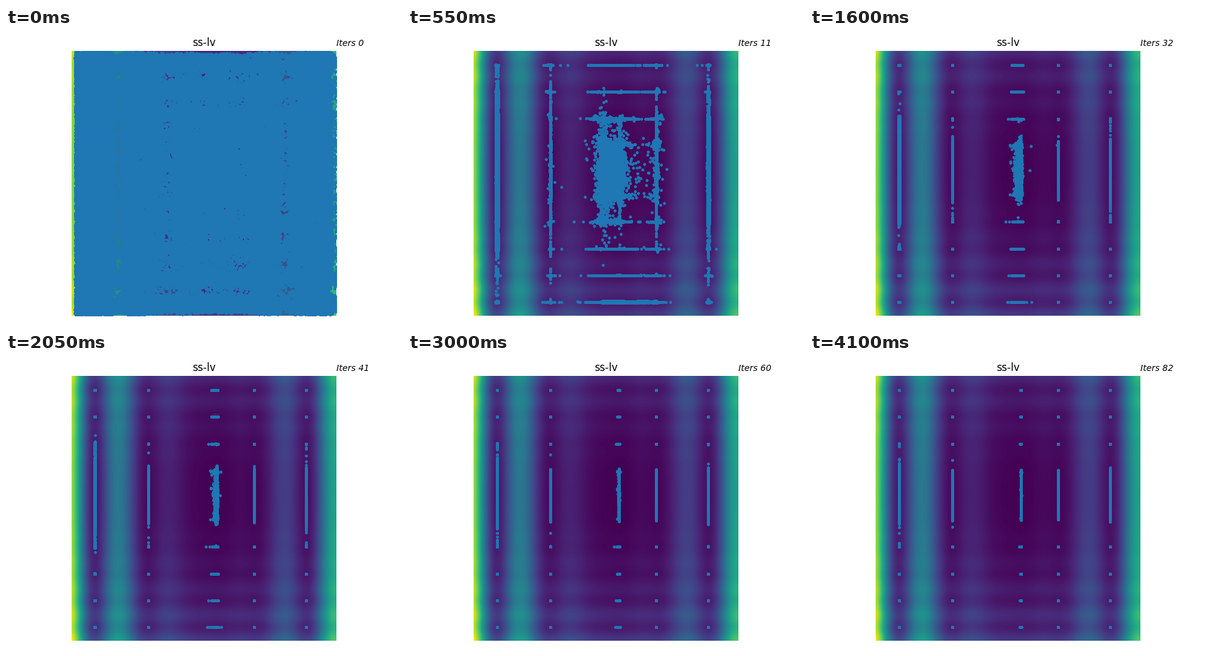
A matplotlib script that plays this animation: 640 by 480 pixels, repeating every 4.15 s.

```python
import numpy as np
import matplotlib.pyplot as plt
from matplotlib.animation import FuncAnimation

FRAMES, INTERVAL = 83, 50
LIMIT = 10
POINTS = 80_000
STEP, DECAY, SOFT = 0.25, 0.975, 2.0


def levy(x, y):
    w, v = 1 + (x - 1) / 4, 1 + (y - 1) / 4
    return (np.sin(np.pi * w) ** 2
            + (w - 1) ** 2 * (1 + 10 * np.sin(np.pi * w + 1) ** 2)
            + (v - 1) ** 2 * (1 + np.sin(2 * np.pi * v) ** 2))


def levy_grad(x, y):
    a, b = (x - 1) / 4, (y - 1) / 4
    s = np.pi * (a + 1) + 1
    gx = (np.pi * np.sin(2 * np.pi * a)
          + 2 * a * (1 + 10 * np.sin(s) ** 2)
          + 10 * np.pi * a ** 2 * np.sin(2 * s))
    gy = (2 * b * (1 + np.sin(2 * np.pi * b) ** 2)
          + 2 * np.pi * b ** 2 * np.sin(4 * np.pi * b))
    return gx / 4, gy / 4


def descend():
    """Gradient descent; the step saturates on steep slopes and shrinks."""
    rng = np.random.default_rng(7)
    x, y = rng.uniform(-LIMIT, LIMIT, (2, POINTS))
    path = []
    for i in range(FRAMES):
        gx, gy = levy_grad(x, y)
        scale = STEP * DECAY ** i / np.sqrt(gx ** 2 + gy ** 2 + SOFT ** 2)
        x, y = x - scale * gx, y - scale * gy
        path.append((x.astype(np.float32), y.astype(np.float32)))
    return path


path = descend()

fig = plt.figure(figsize=(6.4, 4.8), dpi=100)
side = 427.7
ax = fig.add_axes([(320 - side / 2) / 640, 15 / 480, side / 640, side / 480])
ax.set_axis_off()
ax.set_title("ss-lv")

grid = np.linspace(-LIMIT, LIMIT, 428)
ax.imshow(levy(*np.meshgrid(grid, grid)), cmap="viridis", origin="lower",
          extent=(-LIMIT, LIMIT, -LIMIT, LIMIT), aspect="auto")
ax.set(xlim=(-LIMIT, LIMIT), ylim=(-LIMIT, LIMIT))

dots, = ax.plot(*path[0], ls="none", marker="o", ms=3.5, mew=0, color="#1f77b4")
label = ax.text(1, 1.02, "Iters 0", transform=ax.transAxes,
                style="italic", fontsize=10)


def update(i):
    dots.set_data(*path[i])
    label.set_text(f"Iters {i}")
    return dots, label


anim = FuncAnimation(fig, update, frames=FRAMES, interval=INTERVAL,
                     repeat=True, repeat_delay=0)
plt.show()
```
